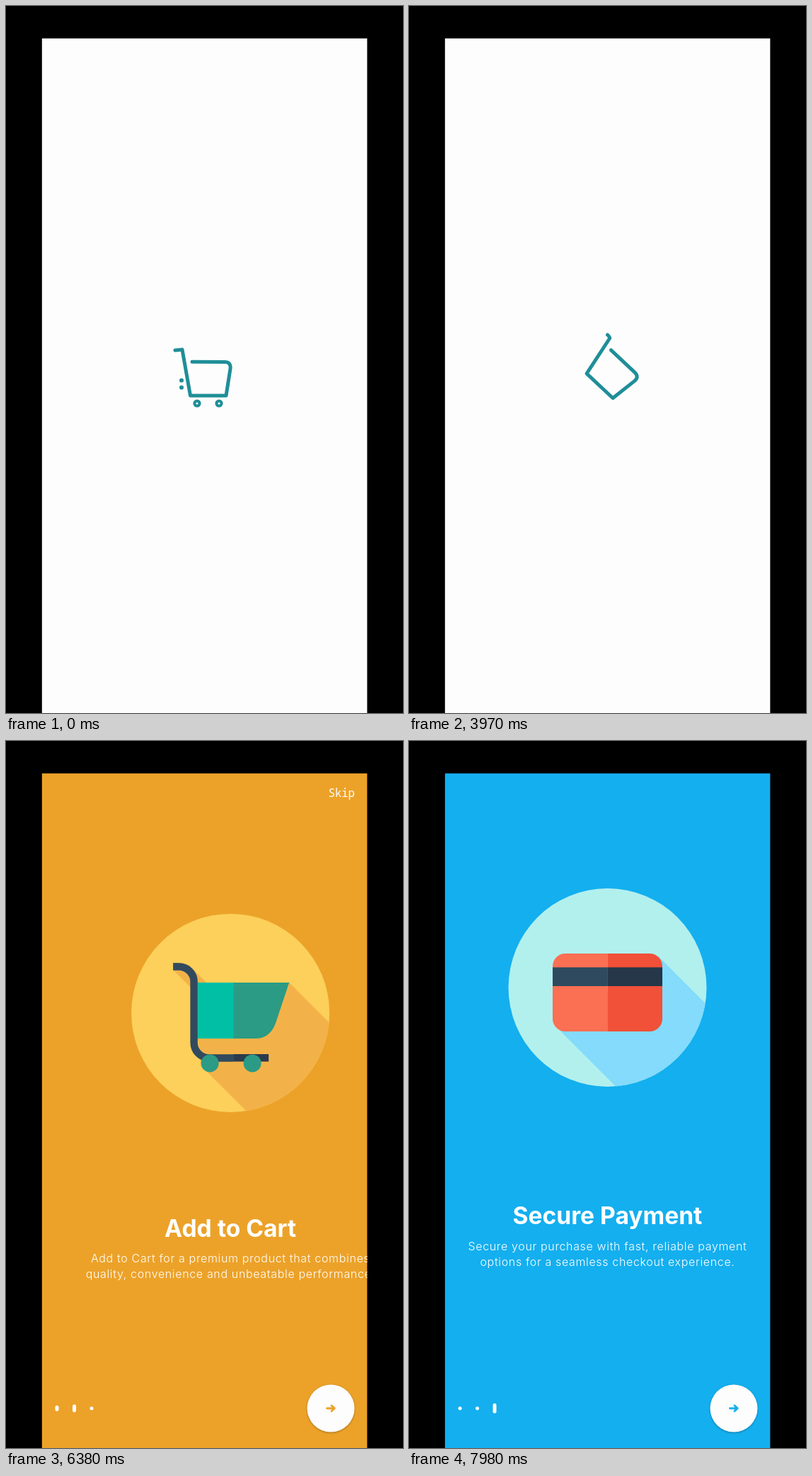
Recreate the animation shown at these times as an HTML page with a canvas. Size 561x998 px, loop 8 s.

```html
<!DOCTYPE html>
<html lang="en">
<head>
<meta charset="utf-8">
<title>Shop onboarding</title>
<style>
  html, body { margin: 0; width: 100%; height: 100%; overflow: hidden; background: #000; }
  canvas { display: block; }
</style>
</head>
<body>
<canvas id="stage" width="561" height="998"></canvas>
<script>
const ctx = document.getElementById('stage').getContext('2d');
const LOOP = 8000, LEFT = 50.6, TOP = 45.6, PAGE_W = 460, MID = 280.5;
const TEAL = '#1f8e98', PAPER = '#fdfdfd';
const { PI, sin, min, max, abs } = Math;

const clamp = u => min(1, max(0, u));
const span = (t, a, b) => clamp((t - a) / (b - a));
const smooth = u => u * u * (3 - 2 * u);
const ease = (t, a, b) => smooth(span(t, a, b));
const lerp = (a, b, u) => a + (b - a) * u;

function fill(color, draw) {
  ctx.fillStyle = color;
  ctx.beginPath();
  draw();
  ctx.fill();
}
function stroke(color, width, draw) {
  ctx.strokeStyle = color;
  ctx.lineWidth = width;
  ctx.beginPath();
  draw();
  ctx.stroke();
}
const disc = (color, x, y, r) => fill(color, () => ctx.arc(x, y, r, 0, 2 * PI));
const rect = (color, x, y, w, h) => fill(color, () => ctx.rect(x, y, w, h));
const poly = (color, ...pts) => fill(color, () => pts.forEach(p => ctx.lineTo(...p)));

// ---- Splash: a cart that rolls, turns into a bag and back ----

// m = 0 is the cart outline, m = 1 the upside-down bag outline
function basket(m) {
  const at = (x0, y0, x1, y1) => [lerp(x0, x1, m), lerp(y0, y1, m)];
  stroke(TEAL, 5, () => {
    ctx.moveTo(...at(-47, -40, -23, -24));
    ctx.quadraticCurveTo(...at(-42, -40.5, -33, -24), ...at(-37, -41, -31.5, -16));
    ctx.lineTo(...at(-25.5, 24, -25, 24));
    ctx.lineTo(...at(25, 24, 26, 24));
    ctx.lineTo(...at(31, -14, 31.5, -16));
    ctx.quadraticCurveTo(...at(32, -23.5, 33, -24), ...at(23, -23.5, 23, -24));
    ctx.lineTo(-23, -23.7);
  });
}

function splash(t) {
  const roll = ease(t, 0, 500) * (1 - ease(t, 1700, 2200));
  const m = ease(t, 1750, 2450) - ease(t, 3480, 4200);
  const hop = span(t, 4260, 4740);
  const bob = roll * (-3.5 + 2.5 * sin((t - 1560) / 60 + 0.9));
  const y = bob - 2 * m - 10 * sin(PI * m) + 6 * hop - 18 * sin(PI * hop);
  ctx.lineCap = ctx.lineJoin = 'round';

  const wheel = 1 - ease(t, 1730, 1950) + ease(t, 4020, 4240);
  if (wheel > 0.02) for (const x of [270, 301])
    stroke(TEAL, 4 * wheel, () => ctx.arc(x + 15 * roll, 561, 3.6 * wheel, 0, 2 * PI));

  const trail = 1 - ease(t, 1690, 1850);
  if (trail > 0) {
    const length = ease(t, 0, 500) * (15 - 2 * sin((t - 1560) / 90 + 1.2)) * trail;
    [[528.5, 1], [538.5, 0.55]].forEach(([ly, k]) => stroke(TEAL, 6 * trail, () => {
      ctx.moveTo(248 - length * k, ly);
      ctx.lineTo(248.01, ly);
    }));
  }

  ctx.save();
  ctx.translate(286 + 13 * roll, 526 + y);
  ctx.rotate(PI * m);
  basket(m);
  ctx.restore();

  const grip = ease(t, 2200, 2540) - ease(t, 3400, 3560);
  if (grip > 0.01) {
    const sway = 0.12 * sin((t - 2580) / 800 * 2 * PI) * span(t, 2580, 2640) * (1 - span(t, 3320, 3380));
    const reach = grip * (PI / 2 + 0.4);
    stroke('#17616d', 4.5, () =>
      ctx.arc(286, 519, 11.5, PI / 2 - reach - sway, PI / 2 + reach - sway));
  }
}

// ---- Onboarding illustrations, centred on 0,0 ----

function badge(color, shade, shadows) {
  disc(color, 0, 0, 140);
  ctx.save();
  ctx.clip();
  shadows.forEach(s => poly(shade, ...s));
  ctx.restore();
}

function bagArt() {
  badge('#a8e6d4', '#7fd0bb', [[[55, -35], [195, 105], [195, 200], [65, 200], [-60, 75]]]);
  stroke('#324a5e', 10, () => ctx.arc(0, -36, 28, PI, 0));
  poly('#fcd05a', [-55, -36], [0, -36], [0, 76], [-62, 76]);
  poly('#f3b249', [0, -36], [55, -36], [62, 76], [0, 76]);
}

function cartArt() {
  badge('#fcd05a', '#f3b249', [
    [[83, -43], [183, 57], [183, 183], [67, 183], [-42, 74], [-46, 36]],
    [[-81, -61], [-52, -32], [-46, -43], [-34, -43], [-60, -69]]
  ]);
  rect('#00bfa5', -46, -43, 50, 79);
  fill('#2b9b85', () => {
    ctx.moveTo(4, -43);
    ctx.lineTo(83, -43);
    ctx.lineTo(64, 14);
    ctx.quadraticCurveTo(56, 36, 35, 36);
    ctx.lineTo(4, 36);
  });
  ctx.lineCap = 'butt';
  stroke('#324a5e', 10.5, () => {
    ctx.moveTo(-81, -65.5);
    ctx.lineTo(-73, -65.5);
    ctx.arcTo(-51.5, -65.5, -51.5, -44, 21.5);
    ctx.lineTo(-51.5, 42);
    ctx.arcTo(-51.5, 63.5, -30, 63.5, 21.5);
    ctx.lineTo(4, 63.5);
  });
  rect('#2b3b4e', 4, 58.2, 50, 10.5);
  disc('#2b9b85', -29, 71, 12.5);
  disc('#2b9b85', 31, 71, 12.5);
}

function cardArt() {
  badge('#b2f0ee', '#84dbfb', [[[72, -44], [183, 67], [183, 183], [55, 183], [-71, 57]]]);
  fill('#fb6f52', () => ctx.roundRect(-77.5, -48, 77.5, 110, [18, 0, 0, 18]));
  fill('#f05138', () => ctx.roundRect(0, -48, 77.5, 110, [0, 18, 18, 0]));
  rect('#2f4a5e', -77.5, -28.5, 77.5, 26.5);
  rect('#253749', 0, -28.5, 77.5, 26.5);
}

const pages = [
  { bg: [29, 154, 143], art: bagArt, title: 'Find Products',
    lines: ['Find products you love from a wide selection', 'of quality items, all in a single place.'] },
  { bg: [236, 162, 41], art: cartArt, title: 'Add to Cart',
    lines: ['Add to Cart for a premium product that combines', 'quality, convenience and unbeatable performance.'] },
  { bg: [20, 175, 239], art: cardArt, title: 'Secure Payment',
    lines: ['Secure your purchase with fast, reliable payment', 'options for a seamless checkout experience.'] }
];

// ---- Onboarding: two swipes ----

const swipes = [5780, 6970], DRAG = 380, SETTLE = 540;

function swipe(t, start) {
  const release = start + DRAG;
  return 0.7 * ease(t, start, release) + 0.3 * (1 - (1 - span(t, release, release + SETTLE)) ** 2.52);
}
const scroll = t => swipes.reduce((sum, start) => sum + swipe(t, start), 0);

function text(str, x, y, font, spacing = 0) {
  ctx.font = font;
  ctx.letterSpacing = spacing + 'px';
  ctx.fillText(str, x, y);
}

function drawPage({ art, title, lines }, x, rise) {
  ctx.save();
  ctx.translate(x, 348 + rise);
  art();
  ctx.restore();
  ctx.fillStyle = '#fff';
  ctx.textAlign = 'center';
  const y = rise / 2;
  text(title, x, 682 + y, 'bold 33.6px Inter, sans-serif');
  lines.forEach((s, i) => text(s, x, 718.5 + 22 * i + y, '300 16px Inter, sans-serif', 0.65));
}

function touch(t, start) {
  const alpha = span(t, start - 60, start) * (1 - span(t, start + DRAG, start + DRAG + 80));
  if (!alpha) return;
  ctx.globalAlpha = 0.4 * alpha;
  const x = 441 - PAGE_W * swipe(min(t, start + DRAG), start);
  disc('#bddbe6', x, 650, 10);
  stroke('#6d8f9c', 1, () => ctx.arc(x, 650, 10, 0, 2 * PI));
  ctx.globalAlpha = 1;
}

function onboarding(t) {
  const pos = scroll(t), lagged = scroll(t - 260);
  const from = min(1, Math.floor(pos));
  const blend = span(pos - from, 0.35, 0.6);
  const bg = `rgb(${pages[from].bg.map((c, i) => lerp(c, pages[from + 1].bg[i], blend))})`;
  rect(bg, LEFT, TOP, PAGE_W, 953);

  pages.forEach((page, i) => {
    const x = MID + (i - pos) * PAGE_W;
    const rise = i === 1 ? 112 * max(0, 1 - lagged) : 0;
    if (abs(i - pos) < 1) drawPage(page, x, rise);
  });

  if (from + blend < 1.5) {
    ctx.fillStyle = '#fff';
    ctx.textAlign = 'left';
    text('Skip', 455.5, 79, '15.6px "Noto Sans Mono", monospace');
  }

  pages.forEach((_, i) => {
    const h = 5 + 9 * max(0, 1 - abs(i - lagged));
    fill('#fff', () => ctx.roundRect(69.5 + 24.5 * i, 942 - h / 2, 5, h, 2.5));
  });

  ctx.shadowColor = 'rgba(0,0,0,.3)';
  ctx.shadowBlur = 3;
  ctx.shadowOffsetY = 1;
  disc(PAPER, 459, 942, 33.5);
  ctx.shadowColor = 'transparent';
  ctx.lineCap = ctx.lineJoin = 'round';
  stroke(bg, 2.8, () => {
    ctx.moveTo(453.5, 942);
    ctx.lineTo(464, 942);
    ctx.moveTo(460, 938);
    ctx.lineTo(464.3, 942);
    ctx.lineTo(460, 946);
  });

  swipes.forEach(start => touch(t, start));
}

function frame(now) {
  const t = now % LOOP;
  rect('#000', 0, 0, 561, 998);
  ctx.save();
  ctx.beginPath();
  ctx.rect(LEFT, TOP, PAGE_W, 953);
  ctx.clip();
  if (t < 5190) {
    rect(PAPER, LEFT, TOP, PAGE_W, 953);
    splash(t);
  } else onboarding(t);
  ctx.restore();
  requestAnimationFrame(frame);
}
requestAnimationFrame(frame);
</script>
</body>
</html>
```
